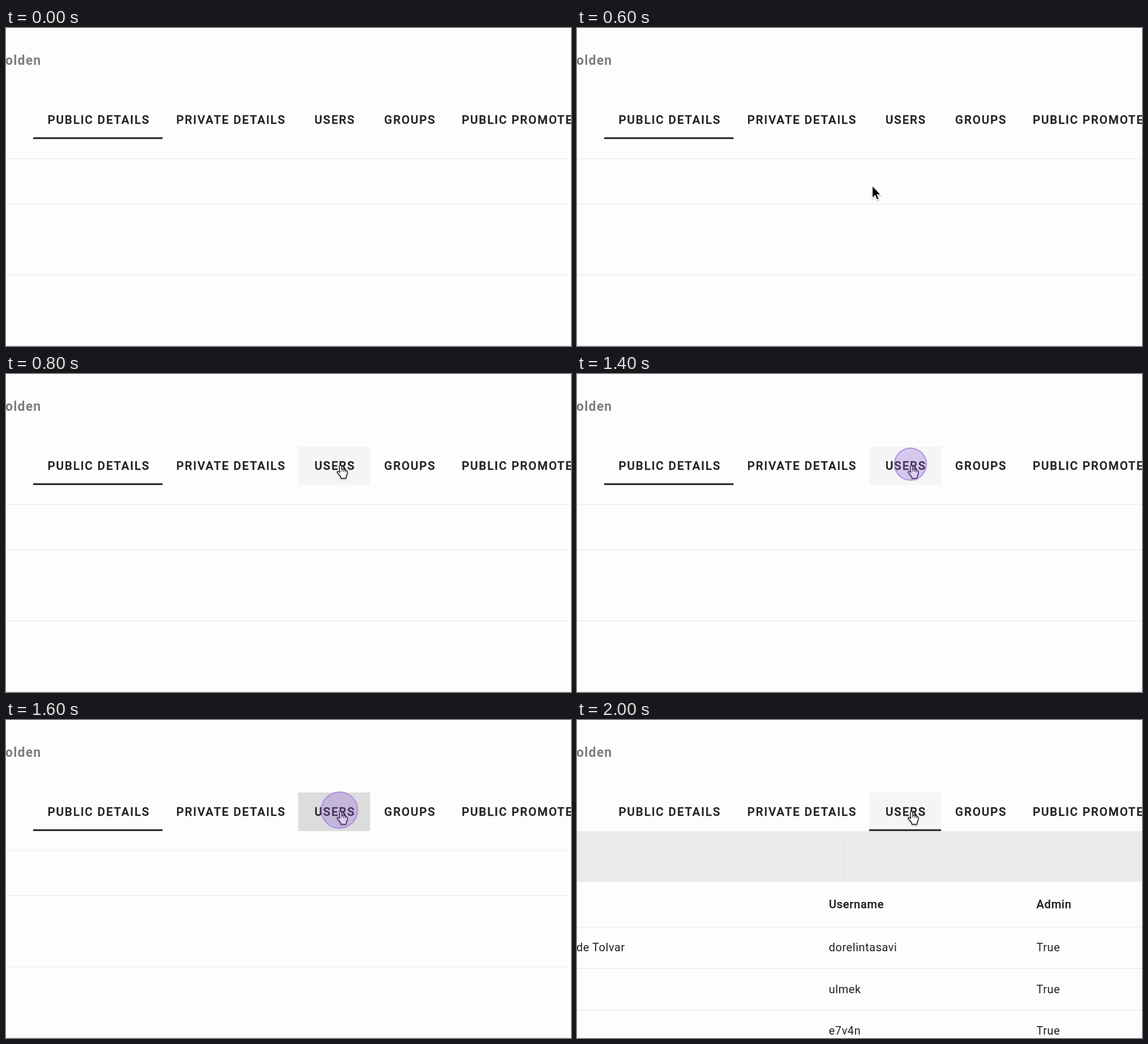
Animation of 998 by 561 pixels, one loop 3 s. Source, as an HTML page:

```html
<!DOCTYPE html>
<html lang="en">
<head>
<meta charset="utf-8">
<title>Switching to the users tab</title>
<style>
  html, body { margin: 0; width: 100%; height: 100%; overflow: hidden; background: #fdfdfd; }
  svg { display: block; width: 998px; height: 561px; }
  text { font-family: Roboto, "Open Sans", sans-serif; fill: #212121; }
  .tabs text { font-size: 20.6px; font-weight: 500; letter-spacing: 1.84px; stroke: #212121; stroke-width: .4px; }
  .mid { text-anchor: middle; }
  .cells text { font-size: 20px; letter-spacing: .55px; }
  .cells .head { font-size: 20.2px; font-weight: 500; letter-spacing: .65px; stroke: #212121; stroke-width: .25px; }
  .title { font-size: 23px; font-weight: 700; letter-spacing: 1.2px; text-anchor: end; fill: #7d7d80; }
  .button { font-size: 17.5px; font-weight: 500; letter-spacing: 1.75px; fill: #f2f4f5; }
  .rule { stroke: #e6e6e6; stroke-width: 1.1; }
</style>
</head>
<body>
<svg viewBox="0 0 998 561">
  <defs>
    <filter id="soft" x="-30%" y="-30%" width="160%" height="160%">
      <feDropShadow dx="0" dy="1.5" stdDeviation="1.2" flood-opacity=".35"/>
    </filter>
  </defs>
  <rect width="998" height="561" fill="#fdfdfd"/>
  <text class="title" x="62.4" y="65">olden</text>

  <g id="details">
    <path class="rule" d="M0 230.5H998M0 310H998M0 435.2H998M0 560.2H998"/>
    <g id="change">
      <rect x="881" y="345" width="150" height="39" rx="5" fill="#607d8b" filter="url(#soft)"/>
      <text class="button" x="898.5" y="370">CHANGE NAME</text>
    </g>
  </g>

  <g id="users" class="cells">
    <rect y="196" width="998" height="90" fill="#ebebeb"/>
    <path d="M471 208V275" stroke="#dadada" stroke-width="1.3"/>
    <path class="rule" d="M0 365.2H998M0 438.4H998M0 512H998"/>
    <text class="head" x="444.9" y="332">Username</text>
    <text class="head" x="811.5" y="332">Admin</text>
    <text x="-1" y="408">de Tolvar</text>
  </g>

  <rect id="hover" x="516" y="128" width="127" height="68"/>
  <g class="tabs">
    <text class="mid" x="163.9" y="169">PUBLIC DETAILS</text>
    <text class="mid" x="397.6" y="169">PRIVATE DETAILS</text>
    <text class="mid" x="581.1" y="169">USERS</text>
    <text class="mid" x="713.7" y="169">GROUPS</text>
    <text x="805" y="169">PUBLIC PROMOTE</text>
  </g>
  <rect id="bar" y="192.8" height="3" fill="#212121"/>

  <path id="arrow" d="M0 0V22.2L5 17.6L8.4 25.2L12 23.6L8.7 16.2H15.4Z" fill="#000"
    stroke="#fff" stroke-width="1.3" filter="url(#soft)"/>
  <g id="hand" transform="translate(583 160)" filter="url(#soft)" stroke="#222" stroke-linecap="round" stroke-linejoin="round">
    <path fill="#fff" stroke-width="1.5" d="M6.6 13.6L6 3.2Q6 1 7.7 1Q9.4 1 9.6 3L10.2 9Q10.5 7.3 12 7.5Q13.5 7.6 13.7 9.2
      Q14.6 8.2 15.9 8.7Q17 9.2 17 10.6Q18.4 9.8 19.4 11Q20.4 12 20 14.5Q19.8 17.5 18 20L17.6 24H8.8L8.2 21.3
      Q5.5 17.5 2.7 14.6Q1.3 12.8 2.6 12Q4 11.4 6.6 13.6Z"/>
    <path fill="none" stroke-width="1.1" d="M10.3 9V12M13.7 9.4V12.4M17 10.8V13"/>
  </g>
  <circle id="press" cx="589" cy="159" stroke="#9d78e0" stroke-width="2"/>
</svg>
<script>
const LOOP = 3000;
const el = id => document.getElementById(id);
const start = performance.now();

// Each step keeps the values of the one before unless it changes them.
const steps = [
  { at: 0, arrow: null, hand: false, hover: null, press: 0, tint: .3, edge: .72, bar: [48, 228.5], change: false, users: false },
  { at: 400, arrow: [241, 362] },
  { at: 600, arrow: [521.5, 278] },
  { at: 800, arrow: null, hand: true, hover: '#f5f5f5' },
  { at: 1200, press: 24 },
  { at: 1400, press: 28.2 },
  { at: 1600, press: 32, hover: '#dcdcdc' },
  { at: 1800, tint: .18, edge: .55, hover: '#c8c8c8', bar: [68, 237], change: true },
  { at: 2000, press: 0, hover: '#f5f5f5', bar: [516, 127], users: true }
];

const rows = [['dorelintasavi', 408], ['ulmek', 482], ['e7v4n', 555]];
for (const [name, y] of rows) {
  addCell(name, 444.7, y);
  addCell('True', 811.5, y);
}

function addCell(label, x, y) {
  const cell = document.createElementNS('http://www.w3.org/2000/svg', 'text');
  cell.setAttribute('x', x);
  cell.setAttribute('y', y);
  cell.textContent = label;
  el('users').append(cell);
}

function set(id, attrs) {
  for (const key in attrs) el(id).setAttribute(key, attrs[key]);
}

function show(id, on) {
  el(id).style.display = on ? '' : 'none';
}

function draw(time) {
  const s = Object.assign({}, ...steps.filter(step => step.at <= time));
  show('arrow', s.arrow);
  if (s.arrow) set('arrow', { transform: `translate(${s.arrow})` });
  show('hand', s.hand);
  show('hover', s.hover);
  set('hover', { fill: s.hover || 'none' });
  show('press', s.press);
  set('press', { r: s.press, fill: `rgba(142,95,215,${s.tint})`, 'stroke-opacity': s.edge });
  set('bar', { x: s.bar[0], width: s.bar[1] });
  show('change', s.change);
  show('details', !s.users);
  show('users', s.users);
}

function tick() {
  draw((performance.now() - start) % LOOP);
  requestAnimationFrame(tick);
}
tick();
</script>
</body>
</html>
```
